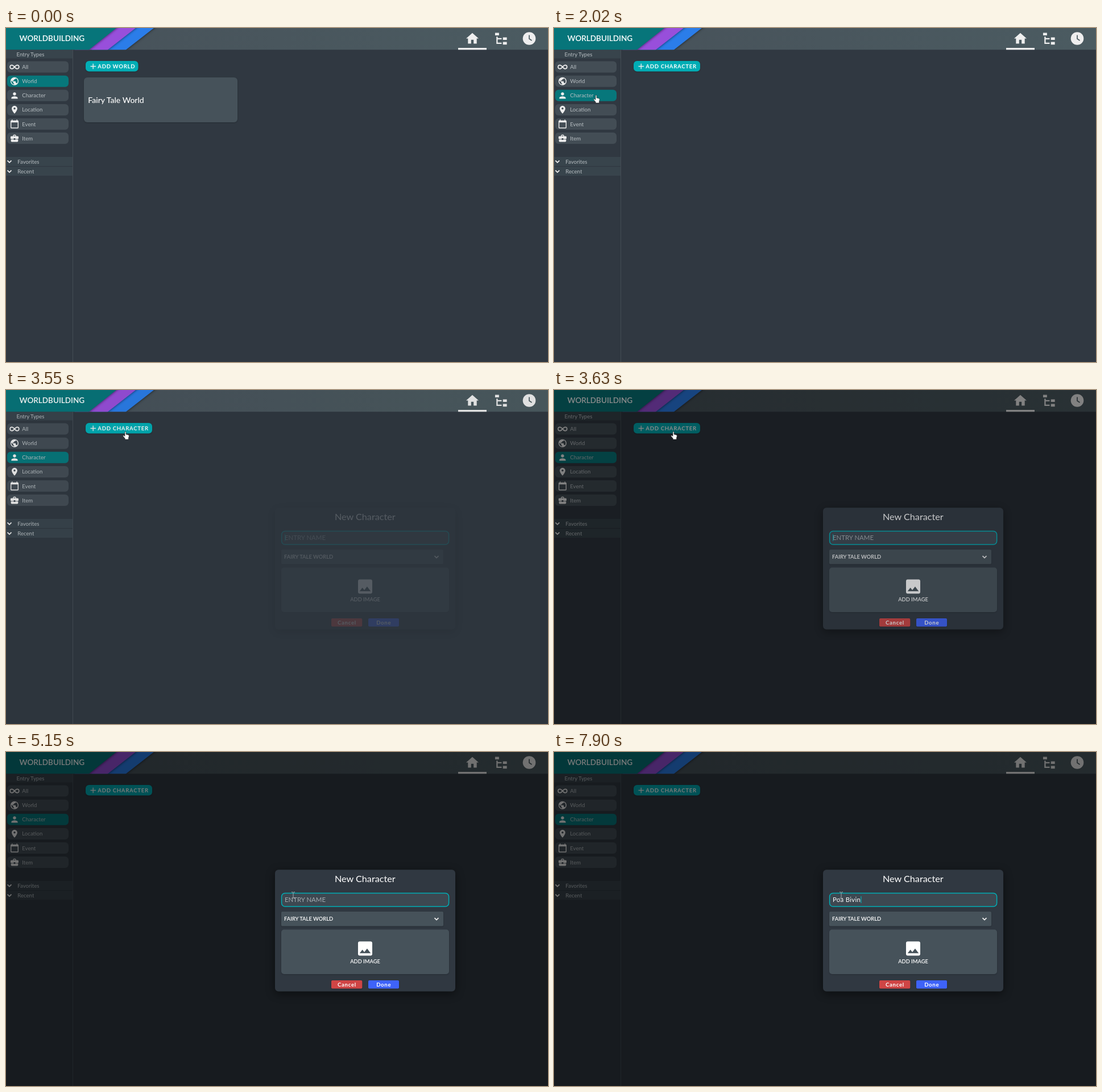
These frames come from a looping animation (953 px wide and 588 px high, 8000 ms). An HTML page:

```html
<!DOCTYPE html>
<html lang="en">
<head>
<meta charset="utf-8">
<title>Worldbuilding</title>
<style>
html, body { margin: 0; width: 100%; height: 100%; overflow: hidden; background: #303841; }
svg { display: block; width: 953px; height: 588px; }
text { font: 9.6px Lato, "Open Sans", sans-serif; fill: #fff; white-space: pre; }
.dim { fill: #b7bec2; }
.mid { text-anchor: middle; }
.bold { font-weight: 600; }
.caps { font-weight: 700; letter-spacing: .7px; }
.bar { fill: #38444c; }
.panel { fill: #46525a; }
.icon { fill: #eee; }
.line { fill: none; stroke: #eee; stroke-width: 1.8; }
.shade { filter: drop-shadow(0 1px 1px #0003); }
.stripe { filter: drop-shadow(1px 0 2px #0008); }
.deep { filter: drop-shadow(0 4px 8px #0007); }
#field text { font-size: 11.4px; }
</style>
</head>
<body>
<svg viewBox="0 0 953 588">
  <defs>
    <linearGradient id="head"><stop stop-color="#475159"/><stop offset="1" stop-color="#4b5b61"/></linearGradient>
    <clipPath id="top"><path d="M0 0H953V38.3H0Z"/></clipPath>
    <path id="chevron" class="line" d="M-3.5-1.7 0 1.8 3.5-1.7"/>
  </defs>
  <rect width="953" height="588" fill="#303841"/>

  <g clip-path="url(#top)">
    <rect width="953" height="39" fill="url(#head)"/>
    <path class="stripe" fill="#2b7de9" d="M220-9H272L260 0 210 39H150Z"/>
    <path class="stripe" fill="#984fdb" d="M180-9H240L228 0 178 39H120Z"/>
    <path class="stripe" fill="#07757a" d="M-9-9H206L194 0 145 39H-9Z"/>
  </g>
  <text x="23.5" y="23.3" class="bold" style="font-size:13.5px">WORLDBUILDING</text>
  <g class="icon">
    <path transform="translate(806.8 5.4) scale(1.1)" d="M10 20v-6h4v6h5v-8h3L12 3 2 12h3v8z"/>
    <path transform="translate(856.5 5) scale(1.15)" d="M3 3H9V7H3ZM15 10H21V14H15ZM15 17H21V21H15ZM13 13H7V18H13V20H5V9H7V11H13Z"/>
    <circle cx="920" cy="18.5" r="11.3"/>
    <rect x="795" y="35" width="50" height="3.3"/>
  </g>
  <path d="M920 12.5V19L924.5 22" fill="none" stroke="#4b5a60" stroke-width="1.7"/>

  <path d="M117.5 38V588" stroke="#444d55"/>
  <path class="bar" d="M0 39H117V53.5H0ZM0 227H117V243H0ZM0 244.2H117V260H0Z"/>
  <text x="43" y="50.4" class="dim mid">Entry Types</text>
  <g id="types"></g>
  <use href="#chevron" x="6" y="235"/>
  <use href="#chevron" x="6" y="252.3"/>
  <text x="20.3" y="238.5" class="dim">Favorites</text>
  <text x="20.3" y="255.7" class="dim">Recent</text>

  <rect id="add" class="shade" x="140" y="58" height="18.5" rx="6" fill="#00adb5"/>
  <path class="line" style="stroke-width:1.4" d="M148.5 67.5H158M153.2 62.8V72.2"/>
  <text id="addText" x="161.3" y="70.9" class="caps"></text>
  <g id="card">
    <rect class="panel shade" x="137" y="87" width="270" height="79" rx="6"/>
    <text x="144.3" y="131.8" style="font-size:14px;font-weight:500">Fairy Tale World</text>
  </g>

  <rect id="veil" width="953" height="588"/>
  <g id="modal">
    <rect class="deep" x="473" y="207.3" width="317" height="214.2" rx="6" fill="#303841"/>
    <text x="631.3" y="228.7" class="mid" style="font-size:16.2px">New Character</text>
    <rect x="484.6" y="248.4" width="294" height="23.6" rx="6" fill="#3d4851" stroke="#00adb5" stroke-width="1.5"/>
    <g id="field">
      <text id="hint" x="490" y="263.6" style="fill:#a5acb1">ENTRY NAME</text>
      <text id="typed" x="490" y="263.6" style="letter-spacing:.3px"></text>
      <path id="caret" d="M0 254V266" stroke="#00bcc4"/>
    </g>
    <rect class="panel shade" x="484" y="281" width="285" height="25.5" rx="2"/>
    <text x="489" y="297.2" class="bold" style="font-size:9.4px">FAIRY TALE WORLD</text>
    <use href="#chevron" x="757" y="293.8"/>
    <rect class="panel shade" x="484" y="312.5" width="295" height="78.5" rx="5"/>
    <path fill="#fff" transform="translate(614.8 329.3) scale(1.39)" d="M21 19V5c0-1.1-.9-2-2-2H5c-1.1 0-2 .9-2 2v14c0 1.1.9 2 2 2h14c1.1 0 2-.9 2-2zM8.5 13.5l2.5 3.01L14.5 12l4.5 6H5l3.5-4.5z"/>
    <text x="631.5" y="371.7" class="mid bold" style="font-size:9.3px">ADD IMAGE</text>
    <rect class="shade" x="572" y="402" width="54.3" height="14.5" rx="2" fill="#cf4545"/>
    <rect class="shade" x="637" y="402" width="54" height="14.5" rx="2" fill="#3e63fa"/>
    <text x="599.4" y="412.6" class="mid caps">Cancel</text>
    <text x="664.2" y="412.6" class="mid caps">Done</text>
  </g>

  <g id="cursor" stroke="#222" stroke-width=".6" fill="#fff">
    <path id="arrow" d="M0 0V10.3L2.3 8.2 3.9 11.8 5.5 11.1 4 7.6H7Z"/>
    <path id="hand" d="M-1 .8Q0-.8 1 .8V5L5 6Q6.6 6.5 6.3 8.2L5.4 11.5V14H-.8V12.2L-4.2 8.2Q-4.4 6.4-2.6 7L-1 8.4Z"/>
    <path id="beam" fill="none" stroke="#aeb5b9" stroke-width=".9" d="M-3-5.5Q0-5.5 0-4.5 0-5.5 3-5.5M0-4.5V4.5M-3 5.5Q0 5.5 0 4.5 0 5.5 3 5.5"/>
  </g>
</svg>
<script>
const $ = id => document.getElementById(id);
const LOOP = 8000, PICK = 1930, FOCUS = 3500, BLINK = 530;
const NAME = "Poa Bivin";
const keyTimes = [5950, 6250, 6400, 6570, 7200, 7520, 7660, 7830, 7900];

const types = [
  ["All", ""],
  ["World", "M12 2C6.48 2 2 6.48 2 12s4.48 10 10 10 10-4.48 10-10S17.52 2 12 2zm-1 17.93c-3.95-.49-7-3.85-7-7.93 0-.62.08-1.21.21-1.79L9 15v1c0 1.1.9 2 2 2v1.93zm6.9-2.54c-.26-.81-1-1.39-1.9-1.39h-1v-3c0-.55-.45-1-1-1H8v-2h2c.55 0 1-.45 1-1V7h2c1.1 0 2-.9 2-2v-.41c2.93 1.19 5 4.06 5 7.41 0 2.08-.8 3.97-2.1 5.39z"],
  ["Character", "M12 12c2.21 0 4-1.79 4-4s-1.79-4-4-4-4 1.79-4 4 1.79 4 4 4zm0 2c-2.67 0-8 1.34-8 4v2h16v-2c0-2.66-5.33-4-8-4z"],
  ["Location", "M12 2C8.13 2 5 5.13 5 9c0 5.25 7 13 7 13s7-7.75 7-13c0-3.87-3.13-7-7-7zm0 9.5a2.5 2.5 0 1 1 0-5 2.5 2.5 0 1 1 0 5z"],
  ["Event", "M20 3h-1V1h-2v2H7V1H5v2H4c-1.1 0-2 .9-2 2v16c0 1.1.9 2 2 2h16c1.1 0 2-.9 2-2V5c0-1.1-.9-2-2-2zm0 18H4V8h16v13z"],
  ["Item", "M10 16v-1H3v4c0 1.1.9 2 2 2h14c1.1 0 2-.9 2-2v-4h-7v1h-4zm10-9h-4V5l-2-2h-4L8 5v2H4c-1.1 0-2 .9-2 2v3c0 1.1.9 2 2 2h6v-2h4v2h6c1.1 0 2-.9 2-2V9c0-1.1-.9-2-2-2zm-6 0h-4V5h4v2z"]
];
const loopIcon = "M12 12C9 8.4 7.4 7.4 5.4 7.4a4.6 4.6 0 0 0 0 9.2C7.4 16.6 9 15.6 12 12S16.6 7.4 18.6 7.4a4.6 4.6 0 0 1 0 9.2C16.6 16.6 15 15.6 12 12";

$("types").innerHTML = types.map(([label, icon], i) => {
  const y = 68.6 + i * 25.1;
  return `<rect x="2" y="${y - 10}" width="108" height="20" rx="6"/>
    <path class="${icon ? "icon" : "line"}" style="stroke-width:2.4" d="${icon || loopIcon}" transform="translate(6.6 ${y - 8.4}) scale(.7)"/>
    <text class="dim" x="28.3" y="${y + 3.5}">${label}</text>`;
}).join("");
const rows = $("types").querySelectorAll("rect");

// Keyframes are [time, value...] and are joined by straight lines.
const path = [
  [150, 857, 570], [450, 560, 400], [700, 270, 240], [920, 107, 150],
  [1080, 86, 129], [1300, 74, 118], [2080, 74, 118], [2400, 100, 108],
  [2700, 145, 83], [2930, 208, 74], [3080, 210, 73], [3980, 210, 73],
  [4170, 260, 106], [4320, 460, 235], [4450, 500, 255], [4630, 507, 259],
  [4760, 507, 259], [4840, 511, 254], [4920, 508, 253], [5000, 508, 253], [5150, 505, 252]
];
// Each row: time, veil, modal.
const fade = [[3470, 0, 0], [3550, .1, .18], [3630, .88, .76], [3710, .97, .95], [3800, 1, 1]];

function at(keys, t) {
  const i = keys.findIndex(k => k[0] > t);
  if (i < 0) return keys[keys.length - 1].slice(1);
  if (i === 0) return keys[0].slice(1);
  const a = keys[i - 1], b = keys[i], p = (t - a[0]) / (b[0] - a[0]);
  return a.slice(1).map((v, n) => v + (b[n + 1] - v) * p);
}

const show = (id, on) => $(id).setAttribute("visibility", on ? "visible" : "hidden");

function draw(t) {
  const picked = t >= PICK;
  rows.forEach((row, i) => row.setAttribute("fill", i === (picked ? 2 : 1) ? "#07777b" : "#434d55"));
  $("add").setAttribute("width", picked ? 117 : 92.5);
  $("addText").textContent = picked ? "ADD CHARACTER" : "ADD WORLD";
  show("card", !picked);

  const [veil, modal] = at(fade, t);
  $("veil").setAttribute("opacity", veil * .52);
  $("modal").setAttribute("opacity", modal);

  const count = keyTimes.filter(k => k <= t).length;
  $("typed").textContent = NAME.slice(0, count);
  show("hint", !count);
  const since = t - (count ? keyTimes[count - 1] : FOCUS);
  show("caret", Math.floor(since / BLINK) % 2 === 0);
  const width = count ? $("typed").getComputedTextLength() : 0;
  $("caret").setAttribute("transform", `translate(${490.7 + width} 0)`);

  const [x, y] = at(path, t);
  $("cursor").setAttribute("transform", `translate(${x} ${y})`);
  const hand = t > 960 && t < 2450 || t > 2850 && t < 4060;
  const beam = t >= 4420;
  show("arrow", t >= 150 && !hand && !beam);
  show("hand", hand);
  show("beam", beam);
}

const start = performance.now();
function tick() {
  draw((performance.now() - start) % LOOP);
  requestAnimationFrame(tick);
}
tick();
</script>
</body>
</html>
```
